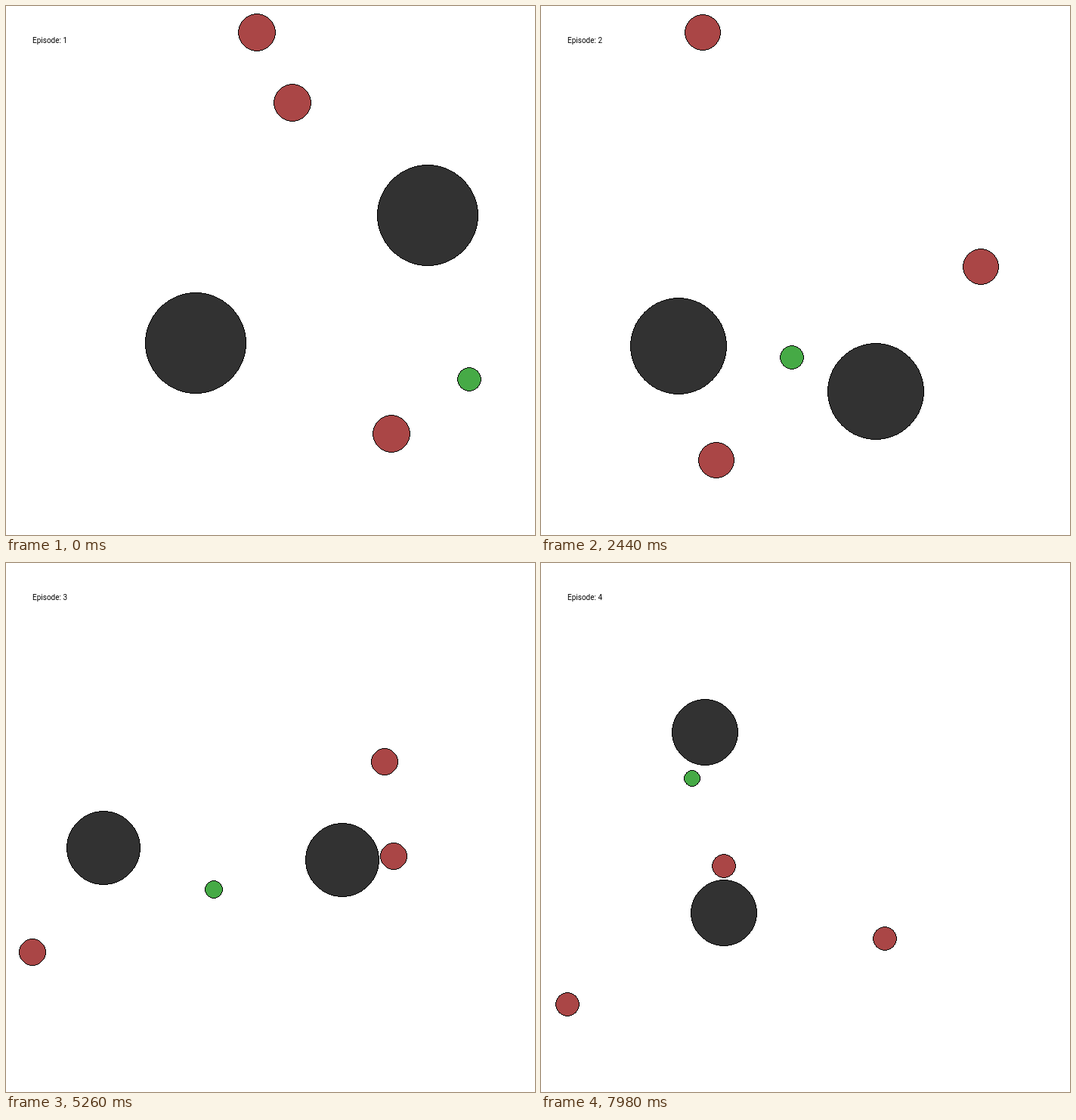
Write an HTML page with a canvas that moves like this. It is 700 px wide and 700 px high and loops after 8000 ms.

```html
<!DOCTYPE html>
<html lang="en">
<head>
<meta charset="utf-8">
<title>Predators and prey</title>
<style>
  html, body { margin: 0; width: 100%; height: 100%; overflow: hidden; background: #fff; }
  canvas { display: block; }
</style>
</head>
<body>
<canvas width="700" height="700"></canvas>
<script>
const LOOP = 8000, EPISODE = 2320, RESET = 20, STEP = 100;
const SIDE = 700, CENTER = 350, REACH = 315, SIZE_FACTOR = 0.952;

const predator = (start, heading, limit) => ({ size: 0.075, color: "#aa4646", start, heading, limit });
const prey = (start, heading) => ({ size: 0.05, color: "#46aa46", start, heading });
const obstacle = (...start) => ({ size: 0.2, color: "#323232", start });

// Every entity runs straight along its heading, in world units, until its limit.
const EPISODES = [
  [
    predator([-0.049, -0.8949], [0, 0.425], 0.86),
    predator([0.0838, -0.6293], [-0.0393, 0.9475]),
    predator([0.4546, 0.615], [-1, -0.007]),
    prey([0.7486, 0.4105], [0.003, -0.1338]),
    obstacle(0.592, -0.206),
    obstacle(-0.28, 0.2745)
  ],
  [
    predator([-0.3193, -0.9344], [-1.004, -0.0037]),
    predator([0.689, -0.0128], [0, 0.005]),
    predator([-0.3393, 0.6651], [-0.1141, 0.9838]),
    prey([-0.0521, 0.3488], [0.002, -0.0741]),
    obstacle(-0.497, 0.298),
    obstacle(0.2767, 0.476)
  ],
  [
    predator([0.5827, -0.8568], [0, 1], 0.85),
    predator([0.6288, 0.1481], [0, 0]),
    predator([-0.6875, 0.6365], [-1, 0]),
    prey([-0.2865, 0.3592], [0, -0.08]),
    obstacle(-0.848, 0.1058),
    obstacle(0.367, 0.1673)
  ],
  [
    predator([0.4431, -0.2851], [0.007, 0.9893]),
    predator([0.4656, 0.227], [-1, -0.008]),
    predator([-0.7428, 0.2865], [-0.6498, 0.7721]),
    prey([-0.638, -0.241], [0, -0.037]),
    obstacle(-0.5632, -0.537),
    obstacle(-0.459, 0.484)
  ]
];

const ctx = document.querySelector("canvas").getContext("2d");
ctx.font = '10px Roboto, "Liberation Sans", sans-serif';

// Distance covered when accelerating from rest against drag, up to top speed.
function travelled(steps) {
  let distance = 0;
  for (let speed = 0; steps > 0; steps--) {
    speed = Math.min(1, speed * 0.75 + 0.3);
    distance += speed * 0.1;
  }
  return distance;
}

function positionOf({ start, heading = [0, 0], limit = Infinity }, distance) {
  return start.map((value, axis) => value + heading[axis] * Math.min(distance, limit));
}

// Midpoint circle without antialiasing: filled rows, then a one-pixel rim.
function drawCircle(cx, cy, radius, color) {
  const rim = [];
  let error = 1 - radius;
  ctx.fillStyle = color;
  for (let x = 0, y = radius; x < y;) {
    if (error >= 0) {
      y--;
      error -= 2 * y;
    }
    x++;
    error += 2 * x + 1;
    for (const [across, down] of [[x, y], [y, x]]) {
      for (const row of [cy + down - 1, cy - down]) {
        ctx.fillRect(cx - across, row, 2 * across, 1);
        rim.push([cx - across, row], [cx + across - 1, row]);
      }
    }
  }
  ctx.fillStyle = "#000";
  rim.forEach(([x, y]) => ctx.fillRect(x, y, 1, 1));
}

function draw(time) {
  const index = Math.floor(time / EPISODE);
  const local = time - index * EPISODE;
  const step = local < RESET ? 0 : 1 + Math.floor((local - RESET) / STEP);
  const distance = travelled(step);
  const entities = EPISODES[index];
  const positions = entities.map(entity => positionOf(entity, distance));

  // The camera zooms so that the farthest entity stays near the edge.
  const scale = REACH / Math.max(...positions.flat().map(Math.abs));
  const toPixel = value => Math.floor(CENTER + value * scale + 1e-6);

  ctx.fillStyle = "#fff";
  ctx.fillRect(0, 0, SIDE, SIDE);
  entities.forEach(({ size, color }, i) => {
    const radius = Math.floor(size * SIZE_FACTOR * scale);
    drawCircle(...positions[i].map(toPixel), radius, color);
  });
  ctx.fillStyle = "#000";
  ctx.fillText(`Episode: ${index + 1}`, 35, 49);
}

const origin = performance.now();
function tick() {
  draw((performance.now() - origin) % LOOP);
  requestAnimationFrame(tick);
}
tick();
</script>
</body>
</html>
```
